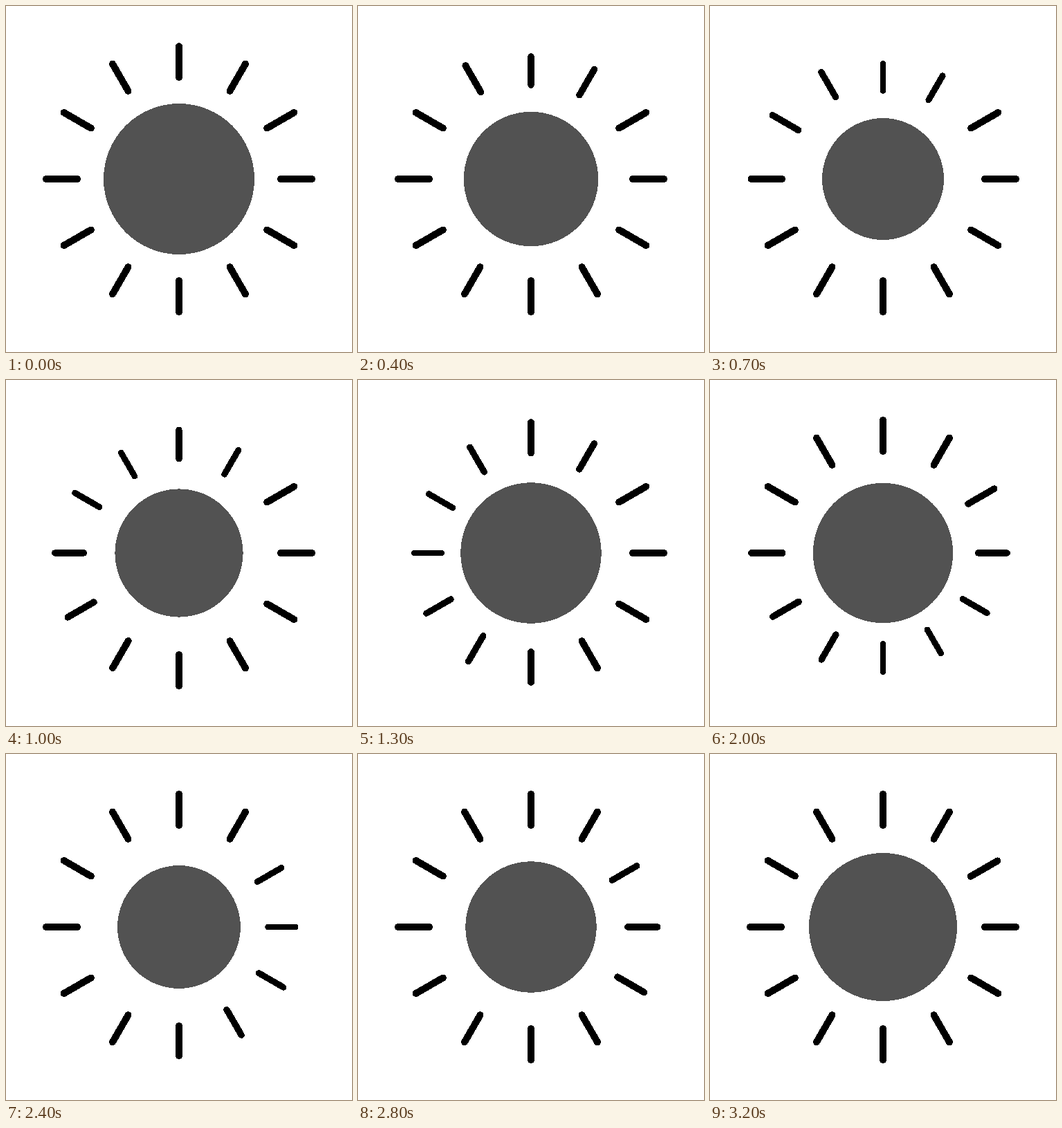
These frames come from a looping animation (500x500 px, 3300 ms). An HTML page:

```html
<!DOCTYPE html>
<html lang="en">
<head>
<meta charset="utf-8">
<title>Pulsing sun</title>
<style>
  html, body { margin: 0; width: 100%; height: 100%; overflow: hidden; background: #fff; }
  svg { display: block; width: 100vw; height: 100vh; }
  line { stroke: #000; stroke-width: 10; stroke-linecap: round; }
</style>
</head>
<body>
<svg viewBox="-250 -250 500 500" shape-rendering="crispEdges">
  <circle r="109" fill="#525252"/>
</svg>
<script>
const LOOP = 3300, STEP = 100;
const svg = document.querySelector('svg');
const disc = document.querySelector('circle');

// Rays in the order they pulse, counted counterclockwise from the right
const rays = [3, 2, 4, 5, 6, 7, 8, 9, 10, 11, 0, 1].map(n => {
  const line = document.createElementNS(svg.namespaceURI, 'line');
  line.setAttribute('x1', 147);
  line.setAttribute('x2', 192);
  svg.append(line);
  return { line, angle: -30 * n };
});

// Linear dip: 1 at the middle, 0 beyond the half width
const dip = (t, mid, half) => Math.max(0, 1 - Math.abs(t - mid) / half);

function draw(t) {
  disc.setAttribute('r', 109 - 23.3 * (dip(t, 775, 760) + dip(t, 2505, 760)));
  rays.forEach(({ line, angle }, i) => {
    const scale = 1 - 0.133 * dip(t, 690 + i * 500 / 3, 700);
    line.setAttribute('transform', `rotate(${angle}) scale(${scale})`);
  });
}

const start = performance.now();
function tick() {
  const t = (performance.now() - start) % LOOP;
  draw(Math.floor(t / STEP) * STEP);
  requestAnimationFrame(tick);
}
tick();
</script>
</body>
</html>
```
